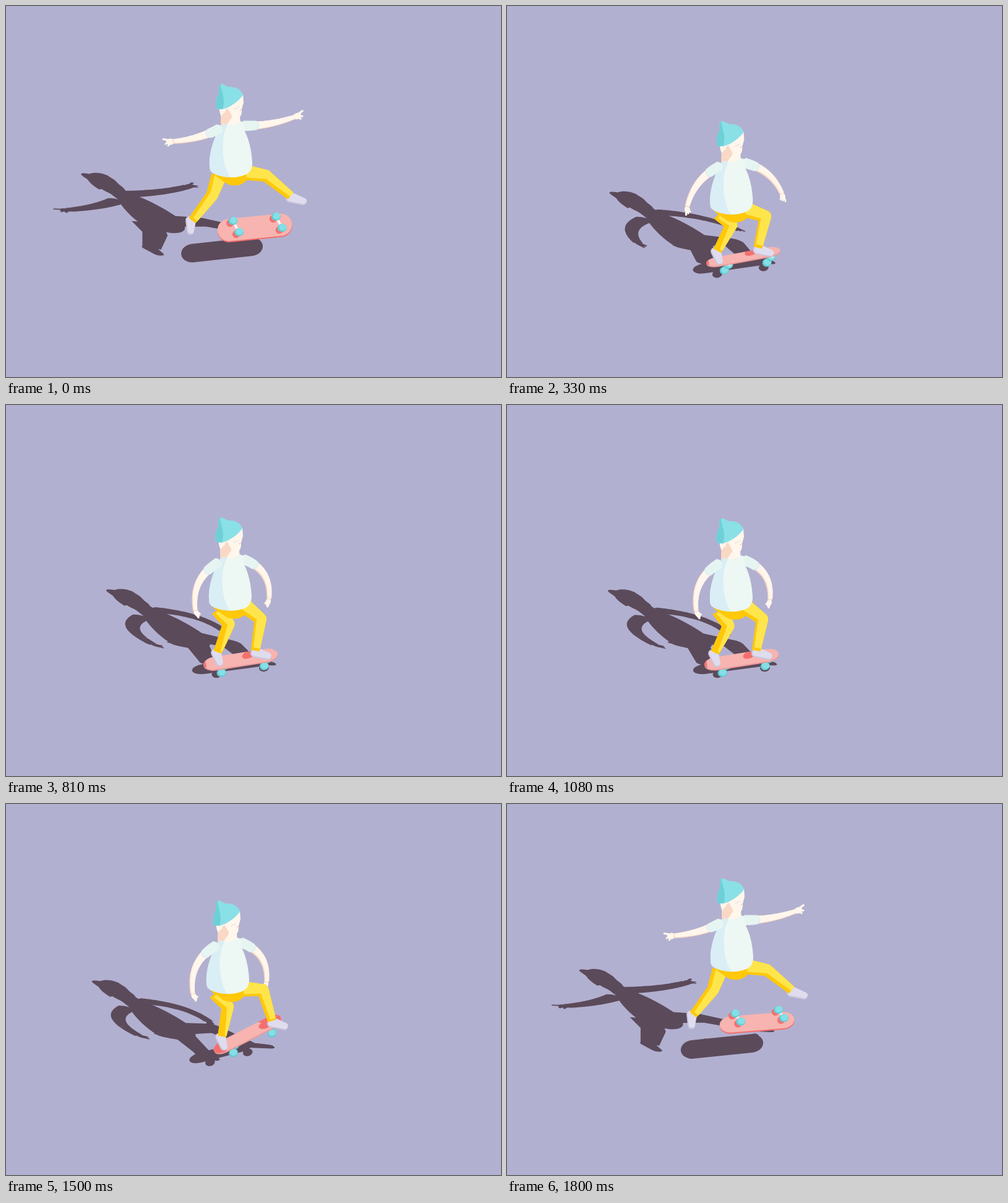
Write an HTML page with a canvas that moves like this. It is 800x600 px and loops after 1.83 s.

```html
<!DOCTYPE html>
<html lang="en">
<head>
<meta charset="utf-8">
<title>Skater</title>
<style>
html, body { margin: 0; width: 100%; height: 100%; overflow: hidden; background: #b2b0d0; }
canvas { display: block; }
</style>
</head>
<body>
<canvas id="stage" width="800" height="600"></canvas>
<script>
const ctx = document.getElementById('stage').getContext('2d');
const LOOP = 1830, STEP = 30, RAD = Math.PI / 180;
const BOARD = 121, THIGH = 34, SHIN = 52;
const C = {
  bg: '#b2b0d0', shadow: '#5b4a5a', hat: '#8ae0e7', hatDark: '#6dd0d7',
  skin: '#fff6ec', blush: '#f9d8c5', shirt: '#edf7f3', shirtDark: '#d9eef5', sleeve: '#e6f5f2',
  pants: '#ffe54c', pantsDark: '#ffc808', shoe: '#dfdcee', shoeDark: '#c9c6de',
  deck: '#f7b4b0', deckDark: '#e99c9c', red: '#f3706f', wheel: '#84dfe6', wheelDark: '#62cbd3'
};

// Key points of the motion, time in ms to value.
const keys = {
  x: { 0: 0, 540: -1, 1080: -1, 1260: -8, 1500: -5, 1800: 0 },
  y: { 0: 0, 180: 37, 330: 60, 540: 64, 900: 54, 1080: 57, 1260: 60, 1500: 30, 1740: -9, 1800: -6 },
  open: { 0: 1, 180: 0.58, 540: 0, 1500: 0, 1800: 1 },
  fly: { 0: 1, 180: 0, 1500: 0, 1800: 1 },
  pop: { 0: 0, 1080: 0, 1260: 0.5, 1500: 1, 1800: 0 },
  slide: { 180: 0.1, 540: 0.23, 1080: 0.14, 1500: 0.12 },
  roll: { 0: -108, 180: 4, 540: 33, 1500: 30, 1800: 224 },
  boardX: { 0: 402, 180: 386, 540: 379, 1080: 379, 1260: 375, 1500: 390, 1800: 404 },
  boardY: { 0: 358, 180: 396, 540: 411, 1080: 411, 1260: 402, 1500: 372, 1800: 353 },
  tilt: { 0: -5.7, 180: -11.3, 540: -8.9, 1080: -8.9, 1260: -25.6, 1500: -27, 1800: -4.8 }
};

// Joint on the body, its place in the shadow; arms swing between low and high [angle, reach].
const armL = { at: [345, 199], cast: [178, 315], side: -1, low: [26, 87], high: [75, 78] };
const armR = { at: [384, 194], cast: [203, 304], side: 1, low: [33, 77], high: [100, 84] };
const legL = { at: [344, 275], cast: [228, 350], bend: 0.7, air: [301, 347] };
const legR = { at: [386, 269], cast: [270, 348], bend: 1, air: [460, 307] };

const hat = new Path2D('M340 166C339 156 340 149 344 142C345 137 343 130 346 127C350 125 354 128 359 131C369 130 380 134 383 144C377 153 363 164 350 167Z');
const hatSide = new Path2D('M340 166C339 156 340 149 344 142C345 137 343 130 347 126C347 138 356 150 350 167Z');
const head = new Path2D('M345 165C344 172 348 176 348 182L347 196L379 192L378 180C381 176 381 172 381 167L384 156L383 143L360 140Z');
const cheek = new Path2D('M347 180L352 172L358 165C361 172 366 176 365 180L356 193L347 193Z');
const shirt = new Path2D('M347 195C336 212 328 238 329 258C329 266 331 268 336 271C350 278 372 279 384 274C394 271 398 264 398 254C397 232 392 214 386 203L385 188L378 186C372 194 356 194 352 190Z');
const shirtSide = new Path2D('M347 195C336 212 328 238 329 258C329 266 331 268 336 271C345 275 355 277 363 277C350 262 345 215 358 192L352 190Z');
const pelvis = new Path2D('M331 264C336 276 348 280 356 287C368 293 385 291 391 278L398 260Z');

const mix = (a, b, u) => a + (b - a) * u;
const mixPoint = (p, q, u) => [mix(p[0], q[0], u), mix(p[1], q[1], u)];

// Smooth cyclic curve through key points, without overshoot.
function track(points, t, turn = 0) {
  const times = Object.keys(points).map(Number), n = times.length;
  const key = j => {
    const lap = Math.floor(j / n), at = times[j - lap * n];
    return { t: at + lap * LOOP, v: points[at] + lap * turn };
  };
  let i = n - 1;
  while (i >= 0 && times[i] > t) i--;
  const [a, b, c, d] = [-1, 0, 1, 2].map(o => key(i + o));
  const slope = (p, q) => (q.v - p.v) / (q.t - p.t);
  const joint = (p, q) => p * q > 0 ? 2 * p * q / (p + q) : 0;
  const h = c.t - b.t, u = (t - b.t) / h, w = 1 - u, mid = slope(b, c);
  const m0 = joint(slope(a, b), mid), m1 = joint(mid, slope(c, d));
  return b.v * w * w * (1 + 2 * u) + c.v * u * u * (3 - 2 * u) + h * u * w * (m0 * w - m1 * u);
}

function armPoints({ at, side, low, high }, open) {
  const a = mix(low[0], high[0], open) * RAD, reach = mix(low[1], high[1], open);
  const bulge = 20 - 25 * open, n = 24;
  return Array.from({ length: n + 1 }, (_, i) => {
    const u = i / n, along = u * reach, out = 3 * u * (1 - u) * bulge;
    return [at[0] + side * (along * Math.sin(a) + out * Math.cos(a)),
            at[1] + along * Math.cos(a) - out * Math.sin(a)];
  });
}

// Two-bone leg: the knee follows from hip and ankle.
function legPoints({ at: [x, y], bend }, ankle) {
  const dx = ankle[0] - x, dy = ankle[1] - y, d = Math.hypot(dx, dy);
  const along = (d * d + THIGH * THIGH - SHIN * SHIN) / (2 * d);
  const out = bend * Math.sqrt(Math.max(0, THIGH * THIGH - along * along));
  return [[x, y], [x + (dx * along + dy * out) / d, y + (dy * along - dx * out) / d], ankle];
}

function pose(t) {
  const p = {};
  for (const name in keys) p[name] = track(keys[name], t, name === 'roll' ? 360 : 0);
  p.roll *= RAD;
  p.tilt *= RAD;
  const step = (leg, f, lift) => {
    const r = (f - 0.5) * BOARD;
    const onBoard = [p.boardX + r * Math.cos(p.tilt) - p.x, p.boardY + r * Math.sin(p.tilt) - lift - p.y];
    return legPoints(leg, mixPoint(onBoard, leg.air, p.fly));
  };
  p.armL = armPoints(armL, p.open);
  p.armR = armPoints(armR, p.open);
  p.legL = step(legL, p.slide, 17);
  p.legR = step(legR, 0.7 + 0.17 * p.pop, 10 - 9 * p.pop);
  p.toeL = [3 - 6 * p.fly, 17];
  p.toeR = [20, 9];
  return p;
}

// Tapered band along points, with round joints and flat ends.
function tube(points, w0, w1) {
  const path = new Path2D(), last = points.length - 1;
  const radius = i => mix(w0, w1, i / last) / 2;
  for (let i = 0; i < last; i++) {
    const [x, y] = points[i], [X, Y] = points[i + 1], l = Math.hypot(X - x, Y - y) || 1;
    const nx = (y - Y) / l, ny = (X - x) / l, r = radius(i), R = radius(i + 1);
    path.moveTo(x + nx * r, y + ny * r);
    path.lineTo(X + nx * R, Y + ny * R);
    path.lineTo(X - nx * R, Y - ny * R);
    path.lineTo(x - nx * r, y - ny * r);
    path.closePath();
    if (i) {
      path.moveTo(x + r, y);
      path.arc(x, y, r, 0, 2 * Math.PI, true);
    }
  }
  return path;
}

function fill(path, color) { ctx.fillStyle = color; ctx.fill(path); }

function layer(dx, dy, paint) {
  ctx.save();
  ctx.translate(dx, dy);
  paint();
  ctx.restore();
}

function shaded(path, dark, light, dx, dy, inner = path) {
  fill(path, dark);
  ctx.save();
  ctx.clip(path);
  layer(dx, dy, () => fill(inner, light));
  ctx.restore();
}

function oval(x, y, rx, ry, color, turn = 0) {
  ctx.fillStyle = color;
  ctx.beginPath();
  ctx.ellipse(x, y, rx, ry, turn, 0, 7);
  ctx.fill();
}

function line(color, width, ...pts) {
  ctx.strokeStyle = color;
  ctx.lineWidth = width;
  ctx.lineCap = ctx.lineJoin = 'round';
  ctx.beginPath();
  pts.forEach(p => ctx.lineTo(...p));
  ctx.stroke();
}

function hand(points, side, open, color) {
  const [[px, py], [x, y]] = points.slice(-2);
  const curl = (side < 0 ? -0.4 : 0.2) * (1 - open);
  layer(x, y, () => {
    ctx.rotate(Math.atan2(y - py, x - px) + curl);
    oval(4, 0, 6 + open, 4 + open, color);
    line(color, 3.2, [4, -2 * side], [12 + open * 3, -side * (1 + open * 4)]);
    line(color, 3, [5, 1], [10 + open * 2, side * (1 + open * 2)]);
    line(color, 3, [4, 2 * side], [8, side * (4 + open * 2)]);
  });
}

function arm(points, side, open) {
  hand(points, side, open, C.skin);
  shaded(tube(points, 15, 7.5), C.blush, C.skin, 1.5, -1.5);
  shaded(tube(points.slice(0, 7), 17, 15), C.shirtDark, C.sleeve, -side, -1);
}

function foot([x, y], [dx, dy], dark, light) {
  const l = Math.hypot(dx, dy), heel = [x - dy / l * 5, y + dx / l * 5];
  const shape = (color, w) => {
    line(color, w, [x, y], heel, [x + dx, y + dy], [x, y]);
    ctx.fillStyle = color;
    ctx.fill();
  };
  shape(dark, 12);
  layer(0.8, -0.8, () => shape(light, 10));
}

function leg(points, toe, dx, dy, thin) {
  foot(points[2], toe, C.shoeDark, C.shoe);
  shaded(tube(points, 25, 14), C.pantsDark, C.pants, dx, dy, tube(points, 25, thin));
}

function deckPath(len, ry) {
  const p = new Path2D(), q = Math.PI / 2, end = len / 2 - 19;
  p.ellipse(end, 0, 19, ry, 0, -q, q);
  p.ellipse(-end, 0, 19, ry, 0, q, 3 * q);
  p.closePath();
  return p;
}

function drawWheels(sin, cos, under) {
  [-30, 40].forEach(x => {
    const spot = s => [x + s * 4, 14 * cos - s * 10 * sin];
    if (under) {
      [-1, 1].forEach(s => oval(spot(s)[0] - 5, spot(s)[1] + 3, 6, 6, C.red));
      line('#f4f4f8', 4, spot(-1), spot(1));
    }
    [-1, 1].forEach(s => {
      const [wx, wy] = spot(s);
      oval(wx, wy, 7.5, 6.5, C.wheelDark);
      oval(wx + 1, wy - 1, 6, 5.5, C.wheel);
      if (!under && s > 0) oval(wx + 2, wy, 1.8, 1.8, '#eafafa');
    });
  });
}

function drawBoard(p) {
  const sin = Math.sin(p.roll), cos = Math.cos(p.roll), under = sin < 0;
  const edgeOn = !under && sin < 0.3, half = BOARD / 2;
  layer(p.boardX, p.boardY, () => {
    ctx.rotate(p.tilt);
    const deck = deckPath(BOARD, Math.max(2.5, Math.abs(sin) * 19));
    if (!under) drawWheels(sin, cos, under);
    layer(0, 2, () => fill(deck, under ? C.red : edgeOn ? C.deck : C.deckDark));
    fill(deck, edgeOn ? C.red : C.deck);
    if (under) return drawWheels(sin, cos, under);
    ctx.clip(deck);
    const kick = Math.min(1, 2 * p.pop);
    ctx.fillStyle = C.red;
    ctx.fillRect(-half, -20, 4 + 14 * kick, 40);
    fill(new Path2D(`M${half - 50 * kick} -20L${half} 20L${half} -20Z`), C.red);
    const [x, y] = p.legR[2];
    ctx.setTransform(1, 0, 0, 1, 0, 0);
    oval(x + p.x - 10, y + p.y + 6, 12, 6, C.red, -0.4);
  });
}

function drawShadow(p) {
  const color = C.shadow, height = 10 + (411 - p.boardY) / 2;
  layer(p.boardX - 1.45 * height, p.boardY + height, () => {
    const len = 140 + 1.3 * p.tilt / RAD;
    ctx.rotate(0.4 * p.tilt - 4 * RAD);
    fill(deckPath(len, 8 + 7 * p.fly), color);
    [-0.2, 0.4].forEach(f => oval(len * f, 13 * Math.cos(p.roll), 8, 6, color));
  });

  // Each part falls onto the ground from its own joint.
  const cast = ({ at, cast }, [a, b, c, d], paint) => layer(...cast, () => {
    ctx.transform(a, b, c, d, 0, 0);
    layer(-at[0], -at[1], paint);
  });
  const limbs = [1.25, -0.05, 0.85, 0.54], trunk = [0.77, -0.21, 0.87, 0.61];
  layer(p.x + 0.75 * p.y, 0.5 * p.y, () => {
    [[legL, p.legL, p.toeL], [legR, p.legR, p.toeR]].forEach(([part, points, toe]) => cast(part, limbs, () => {
      foot(points[2], toe, color, color);
      fill(tube(points, 34, 20), color);
    }));
    [[armL, p.armL], [armR, p.armR]].forEach(([part, points]) => cast(part, limbs, () => {
      fill(tube(points, 19, 11), color);
      hand(points, part.side, p.open, color);
    }));
    cast({ at: [364, 196], cast: [195, 310] }, trunk, () =>
      [hat, head, shirt, pelvis].forEach(shape => fill(shape, color)));
  });
}

function drawSkater(p) {
  arm(p.armR, 1, p.open);
  leg(p.legL, p.toeL, 6, -1, 3 + 8 * p.open);
  fill(pelvis, C.pantsDark);
  leg(p.legR, p.toeR, 4, -4, 14);
  fill(head, C.skin);
  fill(cheek, C.blush);
  oval(352, 169, 2.5, 4, C.skin);
  line('#d8d2d8', 0.8, [369, 167], [377, 163]);
  line('#f0a5a0', 1, [378, 169], [380, 168]);
  fill(shirt, C.shirt);
  fill(shirtSide, C.shirtDark);
  arm(p.armL, -1, p.open);
  fill(hat, C.hat);
  fill(hatSide, C.hatDark);
}

function draw(t) {
  const p = pose(t);
  ctx.fillStyle = C.bg;
  ctx.fillRect(0, 0, 800, 600);
  drawShadow(p);
  drawBoard(p);
  layer(p.x, p.y, () => drawSkater(p));
}

const start = performance.now();
function tick() {
  const t = (performance.now() - start) % LOOP;
  draw(Math.floor(t / STEP) * STEP);
  requestAnimationFrame(tick);
}
tick();
</script>
</body>
</html>
```
